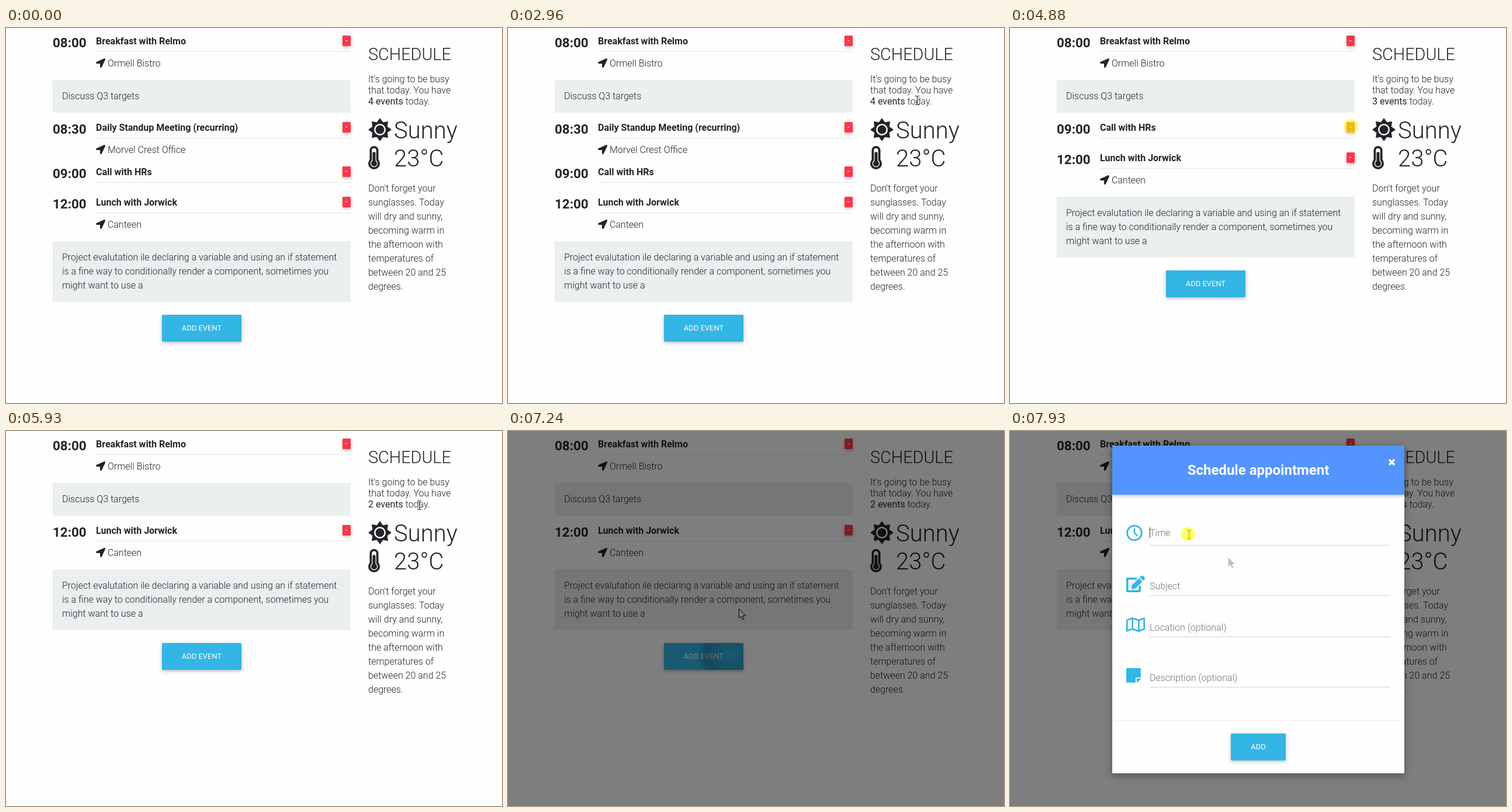
Animation of 849x642 px, one loop 8000 ms. Source, as an HTML page with a canvas:

```html
<!DOCTYPE html>
<html lang="en">
<head>
<meta charset="utf-8">
<title>Schedule</title>
<style>
  html, body { margin: 0; width: 100%; height: 100%; overflow: hidden; background: #fefefe; }
  canvas { display: block; }
</style>
</head>
<body>
<canvas id="stage" width="849" height="642"></canvas>
<script>
const ctx = document.getElementById('stage').getContext('2d');
const LOOP = 8000;
const PAPER = '#fefefe', INK = '#212529', BLUE = '#33b5e5', RED = '#ff3547';
const REMOVALS = [4120, 4960];

const events = [
  { time: '08:00', title: 'Breakfast with Relmo', place: 'Ormell Bistro', notes: ['Discuss Q3 targets'], height: 148 },
  { time: '08:30', title: 'Daily Standup Meeting (recurring)', place: 'Morvel Crest Office', height: 76 },
  { time: '09:00', title: 'Call with HRs', height: 52 },
  { time: '12:00', title: 'Lunch with Jorwick', place: 'Canteen', height: 196, notes: [
    'Project evalutation ile declaring a variable and using an if statement',
    'is a fine way to conditionally render a component, sometimes you',
    'might want to use a'] }
];
const forecast = ["Don't forget your", 'sunglasses. Today', 'will dry and sunny,', 'becoming warm in',
  'the afternoon with', 'temperatures of', 'between 20 and 25', 'degrees.'];

// time, x, y, shape used until the next key
const pointerKeys = [
  [290, 766, 366, 'arrow'], [640, 660, 300, 'arrow'], [860, 597, 190, 'arrow'],
  [1080, 626, 124, 'beam'], [1380, 659.5, 84, 'beam'], [1640, 698, 100, 'beam'],
  [1920, 627, 123, 'beam'], [2000, 619, 126, 'arrow'], [2150, 619, 126, 'arrow'],
  [2300, 620, 121, 'beam'], [2800, 701.5, 124, 'beam'], [2960, 701.5, 124, 'beam'],
  [3100, 650, 185, 'arrow'], [3400, 513, 220, 'arrow'], [3720, 589, 165, 'arrow'],
  [3790, 585.5, 169, 'none'], [3960, 585.5, 169, 'beam'], [5000, 585.5, 169, 'beam'],
  [5350, 633, 118, 'beam'], [5590, 633, 118, 'beam'], [5950, 712, 128, 'beam'],
  [6360, 618, 127, 'beam'], [6440, 612, 140, 'arrow'], [7000, 377, 381, 'arrow'],
  [7100, 377, 381, 'arrow'], [7240, 395, 305, 'arrow'], [7390, 374, 217, 'arrow'],
  [7560, 306.5, 177, 'beam'], [LOOP, 306.5, 177, 'beam']
];
const presses = [[3960, 4130], [4800, 4970], [7930, LOOP]];

const clamp = v => Math.max(0, Math.min(1, v));
const font = (weight, size) => `${weight} ${size}px Roboto, sans-serif`;

function text(str, x, y, weight = 300, size = 16, color = INK, align = 'left') {
  ctx.font = font(weight, size);
  ctx.fillStyle = color;
  ctx.textAlign = align;
  ctx.fillText(str, x, y);
  return ctx.measureText(str).width;
}

function rect(x, y, w, h, color) {
  ctx.fillStyle = color;
  ctx.fillRect(x, y, w, h);
}

function disc(x, y, r, color) {
  ctx.fillStyle = color;
  ctx.beginPath();
  ctx.arc(x, y, r, 0, Math.PI * 2);
  ctx.fill();
}

function raised(x, y, w, h, color, lifted = false, radius = 2) {
  const shadows = lifted ? [[5, 11, 0.18], [4, 15, 0.15]] : [[2, 5, 0.16], [2, 10, 0.12]];
  ctx.save();
  ctx.fillStyle = color;
  for (const [dy, blur, alpha] of shadows) {
    ctx.shadowOffsetY = dy;
    ctx.shadowBlur = blur;
    ctx.shadowColor = `rgba(0,0,0,${alpha})`;
    ctx.beginPath();
    ctx.roundRect(x, y, w, h, radius);
    ctx.fill();
  }
  ctx.restore();
}

function button(x, y, w, label, color = BLUE, lifted = false) {
  raised(x, y, w, 46, color, lifted);
  text(label, x + w / 2, y + 27, 400, 12.96, '#fff', 'center');
}

function at(x, y, scale, draw) {
  ctx.save();
  ctx.translate(x, y);
  ctx.scale(scale, scale);
  draw();
  ctx.restore();
}

function fillPath(path, color) {
  ctx.fillStyle = color;
  ctx.fill(new Path2D(path));
}

function strokePath(path, width, color) {
  ctx.strokeStyle = color;
  ctx.lineWidth = width;
  ctx.lineJoin = 'round';
  ctx.stroke(new Path2D(path));
}

function placeIcon(x, y) {
  at(x, y, 16 / 512, () => fillPath(
    'M444 4L29 195C-19 218-3 288 48 288H224V464C224 515 294 531 317 483L508 68C524 29 483-12 444 4Z', INK));
}

function sunIcon(x, y) {
  ctx.beginPath();
  for (let i = 0; i < 16; i++) {
    const r = i % 2 ? 12.8 : 18.6, a = i * Math.PI / 8;
    ctx.lineTo(x + r * Math.cos(a), y + r * Math.sin(a));
  }
  ctx.closePath();
  ctx.fillStyle = ctx.strokeStyle = INK;
  ctx.lineWidth = 1.6;
  ctx.lineJoin = 'round';
  ctx.fill();
  ctx.stroke();
  disc(x, y, 10, PAPER);
  disc(x, y, 7.5, INK);
}

function thermometerIcon(x, y) {
  at(x, y, 40 / 512, () => {
    ctx.lineCap = 'round';
    for (const [top, half, bulb, color] of [[96, 96, 128, INK], [96, 48, 80, PAPER], [160, 32, 64, INK]]) {
      strokePath(`M128 ${top}V370`, half * 2, color);
      disc(128, 384, bulb, color);
    }
  });
}

function drawEvent(event, y) {
  text(event.time, 80, y + 33, 700, 22.4);
  text(event.title, 154, y + 28, 700);
  rect(154, y + 40, 436, 1, '#e4e5e6');
  raised(576, y + 13, 14, 18, RED);
  text('-', 583, y + 26, 500, 13, '#fff', 'center');
  if (event.place) {
    placeIcon(154, y + 52);
    text(event.place, 173.9, y + 66);
  }
  if (event.notes) {
    rect(80, y + 89, 510, event.notes.length * 24 + 32, '#ebeff0');
    event.notes.forEach((line, i) => text(line, 96, y + 122 + i * 24));
  }
}

function drawSidebar(count) {
  text('SCHEDULE', 620, 55, 300, 28.8);
  text("It's going to be busy", 620, 93);
  text('that today. You have', 620, 112);
  const width = text(`${count} events`, 620, 131, 400);
  text(' today.', 620 + width, 131);
  sunIcon(640, 174);
  text('Sunny', 664, 189, 300, 40);
  thermometerIcon(620, 202);
  text('23°C', 664, 237, 300, 40);
  forecast.forEach((line, i) => text(line, 620, 280 + i * 24));
}

function drawRipple(y) {
  const glow = ctx.createRadialGradient(380, y + 20, 0, 380, y + 20, 56);
  glow.addColorStop(0, 'rgba(0,0,0,0)');
  glow.addColorStop(0.75, 'rgba(0,0,0,0.2)');
  glow.addColorStop(1, 'rgba(0,0,0,0)');
  ctx.save();
  ctx.beginPath();
  ctx.rect(267, y, 136, 46);
  ctx.clip();
  rect(267, y, 136, 46, glow);
  ctx.restore();
}

function drawPage(t) {
  rect(0, 0, 849, 642, PAPER);
  const removed = REMOVALS.filter(time => t >= time).length;
  const shown = events.filter((_, i) => i === 0 || i > removed);
  let y = 0;
  for (const event of shown) {
    drawEvent(event, y);
    y += event.height;
  }
  const hover = t > 6920 && t < 7160;
  button(267, y + 19, 136, 'ADD EVENT', hover ? '#2ba5d5' : BLUE, hover);
  if (t > 7120) drawRipple(y + 19);
  drawSidebar(shown.length);
}

function drawFieldIcons() {
  ctx.lineCap = 'round';
  ctx.beginPath();
  ctx.arc(213, 174.5, 12.4, 0, Math.PI * 2);
  ctx.strokeStyle = BLUE;
  ctx.lineWidth = 2.8;
  ctx.stroke();
  strokePath('M213 167.5V175L217.5 178.5', 2.5, BLUE);

  const unit = 32 / 576;
  at(199, 247.5, unit, () => {
    ctx.lineCap = 'butt';
    strokePath('M330 96H32V480H416V315', 64, BLUE);
    fillPath('M396 78L498 180L274 406L160 418L170 302Z', BLUE);
    fillPath('M418 54L460 12Q488-10 516 12L565 60Q586 88 565 116L522 158Z', BLUE);
  });
  at(199, 317.3, unit, () => strokePath(
    'M24 117L192 56L384 120L552 62V395L384 456L192 392L24 450ZM192 56V392M384 120V456', 48, BLUE));
  at(199, 404.2, unit, () => {
    fillPath('M312 320H448V56Q448 32 424 32H24Q0 32 0 56V456Q0 480 24 480H288V344Q288 320 312 320Z', BLUE);
    fillPath('M448 352V358Q448 368 441 375L343 473Q336 480 326 480H320V352Z', BLUE);
  });
}

function drawModal(t) {
  const slide = 1 - clamp((t - 7260) / 300);
  ctx.save();
  ctx.globalAlpha = clamp((t - 7250) / 150);
  ctx.translate(0, -50 * slide * slide);
  raised(175, 25, 500, 561, '#fff', true);
  rect(175, 25, 500, 561, PAPER);
  raised(175, 25, 500, 84, '#5394ff', false, [2, 2, 0, 0]);
  text('Schedule appointment', 425, 75, 700, 24, '#fff', 'center');
  ctx.lineCap = 'butt';
  strokePath('M649 49L658 58M658 49L649 58', 3.6, '#fff');
  drawFieldIcons();
  const fields = [['Time', 180], ['Subject', 271], ['Location (optional)', 342], ['Description (optional)', 428]];
  for (const [label, y] of fields) {
    text(label, 239, y, 300, 16, '#757575');
    rect(239, y + (label === 'Time' ? 15 : 10), 412, 1, '#ced4da');
  }
  rect(175, 495, 500, 1, '#e9ecef');
  button(378, 518, 94, 'ADD');
  ctx.restore();
  if (t >= 7930) rect(239, 165, 1, 18, '#333');
}

const ARROW = 'M.5.5V16.5L4.2 13L6.8 18.7L9.2 17.6L6.7 12H11.8Z';

function drawPointer(t) {
  const next = pointerKeys.findIndex(key => key[0] > t);
  if (next < 1) return;
  const [t0, x0, y0, shape] = pointerKeys[next - 1];
  const [t1, x1, y1] = pointerKeys[next];
  const k = (t - t0) / (t1 - t0);
  const x = Math.round(x0 + (x1 - x0) * k), y = Math.round(y0 + (y1 - y0) * k);
  if (shape === 'arrow') {
    at(x, y, 1, () => {
      fillPath(ARROW, '#fff');
      strokePath(ARROW, 1, '#000');
    });
  } else if (shape === 'beam') {
    // the text cursor inverts whatever lies below it
    ctx.save();
    ctx.globalCompositeOperation = 'difference';
    rect(x - 1, y - 7, 1, 14, '#fff');
    for (const edge of [y - 8, y + 7]) {
      rect(x - 4, edge, 3, 1, '#fff');
      rect(x, edge, 3, 1, '#fff');
    }
    ctx.restore();
  }
  if (presses.some(([from, to]) => t >= from && t < to)) {
    disc(x - 2.5, y - 0.8, 12, 'rgba(255,255,0,0.6)');
  }
}

function draw(t) {
  drawPage(t);
  const modalOpen = t >= 7250;
  if (!modalOpen) drawPointer(t);
  const dim = 0.5 * clamp((t - 7090) / 140);
  if (dim) rect(0, 0, 849, 642, `rgba(0,0,0,${dim})`);
  if (modalOpen) {
    drawModal(t);
    if (t > 7400) at(373, 216, 1, () => fillPath(ARROW, '#bdbdbd'));
    drawPointer(t);
  }
}

const start = performance.now();
function tick() {
  draw((performance.now() - start) % LOOP);
  requestAnimationFrame(tick);
}
tick();
</script>
</body>
</html>
```
